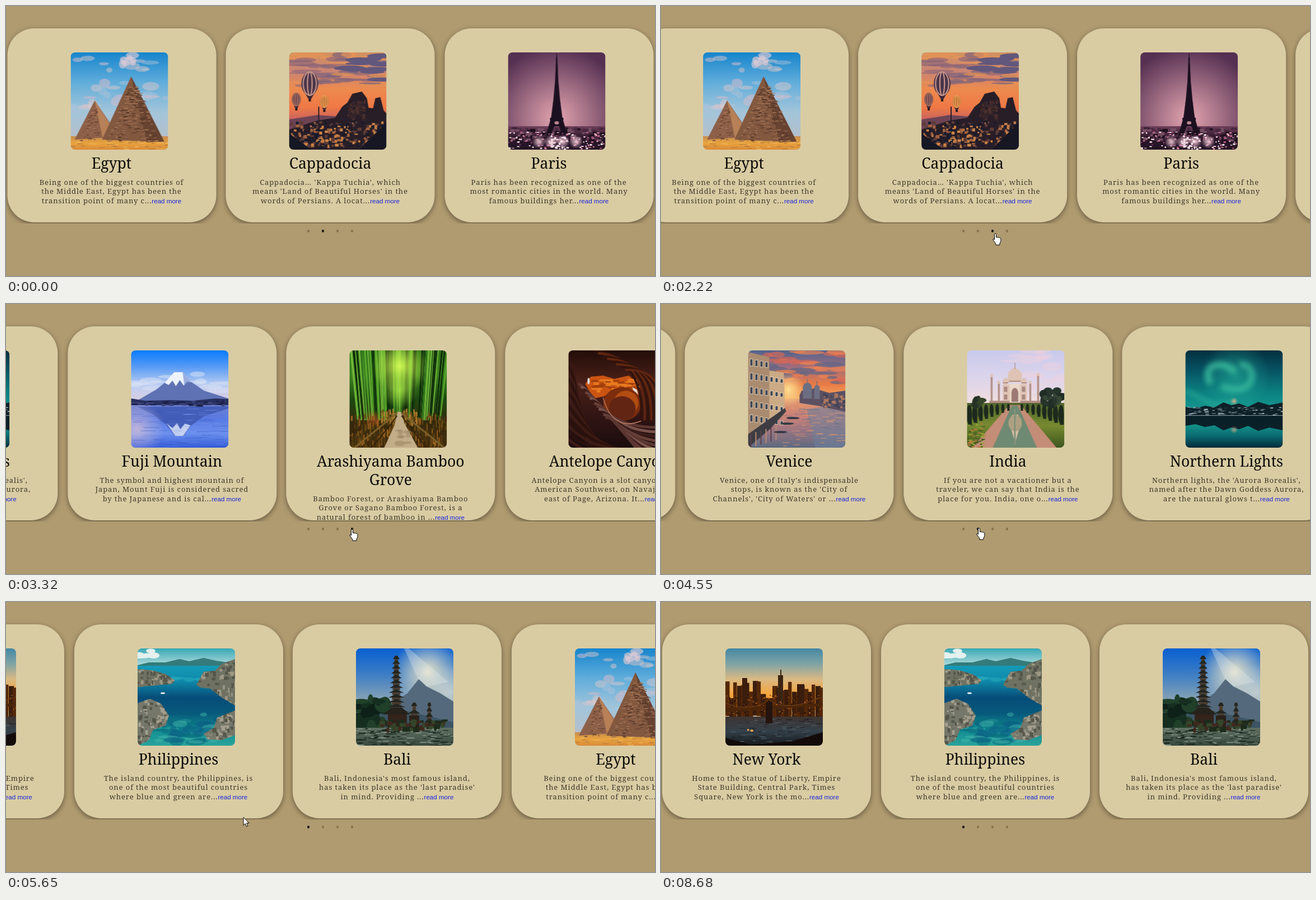
Recreate the animation shown at these times as an HTML page with a canvas. Size 1159 by 483 pixels, loop 9180 ms.

```html
<!DOCTYPE html>
<html lang="en">
<head>
<meta charset="utf-8">
<title>Destinations</title>
<style>
html, body { margin: 0; width: 100%; height: 100%; overflow: hidden; background: #b09b70; }
#view { position: absolute; left: 0; top: 0; width: 1159px; height: 389px; overflow: hidden; }
#track { position: absolute; left: 0; top: 0; }
.card { position: absolute; top: 40px; width: 373px; height: 347px; border-radius: 48px;
  background: #d9cca3; box-shadow: 0 3px 10px rgba(0,0,0,.42); text-align: center; white-space: nowrap;
  font-family: "Noto Serif", serif; }
.card canvas { display: block; margin: 43px 0 0 113px; border-radius: 8px; }
h2 { margin: 8px 0 8.6px; font-size: 26.5px; line-height: 33px; font-weight: 500; color: #0c0b08; }
p { margin: 0; font-size: 13px; line-height: 16.7px; letter-spacing: .9px; font-weight: 300; color: #40382a; }
p span { font: 11.6px/0 "Liberation Sans", Arial, sans-serif; letter-spacing: 0; color: #1a26dd; }
.dot { position: absolute; top: 400px; width: 4.6px; height: 4.6px; border-radius: 50%; }
svg { position: absolute; left: 0; top: 0; overflow: visible; fill: #fff; stroke: #000; stroke-linejoin: round; }
</style>
</head>
<body>
<div id="view"><div id="track"></div></div>
<svg id="cursor" width="20" height="24"><path/></svg>
<script>
const LOOP = 9180, PITCH = 390.5, S = 174;
let g, seed;

// Drawing helpers for the 174 px pictures
const rnd = () => (seed = seed * 16807 % 2147483647) / 2147483647;
const box = (c, x, y, w, h) => { g.fillStyle = c; g.fillRect(x, y, w, h); };
const oval = (c, x, y, rx, ry = rx) => {
  g.fillStyle = c; g.beginPath(); g.ellipse(x, y, rx, ry, 0, 0, 7); g.fill();
};
const poly = (c, ...p) => {
  g.fillStyle = c; g.beginPath();
  for (let i = 0; i < p.length; i += 2) g.lineTo(p[i], p[i + 1]);
  g.fill();
};
const fade = (y0, y1, ...cols) => {
  const f = g.createLinearGradient(0, y0, 0, y1);
  cols.forEach((c, i) => f.addColorStop(i / (cols.length - 1), c));
  box(f, 0, y0, S, y1 - y0);
};
const glow = (c, x, y, r) => {
  const f = g.createRadialGradient(x, y, 0, x, y, r);
  f.addColorStop(0, c); f.addColorStop(1, c.slice(0, 7) + "00");
  box(f, 0, 0, S, S);
};
const specks = (cols, n, x, y, w, h, sw, sh) => {
  while (n--) box(cols[n % cols.length], x + rnd() * w, y + rnd() * h, sw * (.5 + rnd()), sh * (.5 + rnd()));
};
const clouds = (cols, n, x, y, w, h, rx, ry) => {
  while (n--) oval(cols[n % cols.length], x + rnd() * w, y + rnd() * h, rx * (.4 + rnd()), ry * (.4 + rnd()));
};
const rock = (light, dark, x, y, w, h, ...p) => {
  g.save(); poly(dark, ...p); g.clip();
  specks([light, dark, "#55564a"], 130, x, y, w, h, 5, 6);
  g.restore();
};
const curve = (c, width, x, y, ...b) => {
  g.strokeStyle = c; g.lineWidth = width; g.beginPath(); g.moveTo(x, y); g.bezierCurveTo(...b); g.stroke();
};

function newYork() {
  fade(0, 110, "#4488a4", "#7fa3a4", "#d9b983", "#f5a53c", "#ee7d18");
  for (let x = 0; x < S; x += 7) box(x % 2 ? "#3b1d0d" : "#532708", x, 58 + rnd() * 32, 6 + rnd() * 4, 62);
  box("#3a2414", 94, 48, 9, 70); box("#3a2414", 98, 38, 2, 12);
  box("#3b1d0d", 30, 53, 9, 60); box("#3b1d0d", 128, 64, 13, 50);
  specks(["#b8621c", "#6b3510", "#241008"], 170, 0, 82, S, 38, 2, 2);
  fade(122, S, "#3e3430", "#33404a", "#15191d");
  specks(["#4d5961", "#221f20"], 110, 0, 126, S, 44, 8, 1);
  poly("#4a2509", 0, 107, S, 98, S, 103, 0, 114);
  box("#25140e", 72, 94, 12, 40);
  curve("#6a3a16", 1.5, 0, 97, 30, 112, 60, 105, 77, 93);
  curve("#6a3a16", 1.5, 79, 93, 100, 108, 135, 105, S, 86);
  poly("#130b0a", 0, 160, 45, 172, 120, 166, S, 150, S, S, 0, S);
  specks(["#f0b050"], 5, 38, 144, 12, 4, 3, 2);
}

function philippines() {
  fade(0, 32, "#38a8b4", "#b4dddd");
  clouds(["#e4f1ee"], 5, 0, 4, 40, 10, 16, 4);
  poly("#347b7a", 0, 30, 20, 25, 50, 25, 75, 19, 92, 23, 118, 17, 140, 22, S, 27, S, 34, 0, 34);
  fade(31, S, "#159bb9", "#0f87a8", "#064c78", "#075a7c", "#128d93", "#2aa39b");
  clouds(["#0b5f8499", "#45b9ac77", "#0a6f7f88"], 40, 30, 116, 120, 54, 14, 5);
  clouds(["#24a9bb99"], 8, 55, 52, 70, 6, 16, 3);
  rock("#9d9885", "#6f7262", 0, 32, 70, 45, 0, 37, 25, 39, 50, 46, 66, 57, 62, 63, 35, 66, 0, 69);
  rock("#9d9885", "#6f7262", 104, 20, 70, 84, 105, 65, 118, 42, 138, 40, 150, 28, S, 19, S, 102, 150, 88, 130, 72, 112, 70);
  rock("#a39e8e", "#75776a", 0, 90, 56, 84, 0, 98, 22, 90, 42, 99, 56, 120, 50, 138, 28, 145, 20, 164, 0, S);
  rock("#a39e8e", "#75776a", 118, 112, 56, 54, 118, 153, 136, 142, 142, 124, S, 111, S, 155, 150, 164, 126, 163);
  oval("#f0f4f2", 45, 80, 4, 1.6);
}

function pagoda(x, top, base, wide, tiers) {
  for (let i = 0; i < tiers; i++) {
    const y = top + (base - top) * i / tiers, w = wide * (.35 + .65 * i / tiers) / 2;
    poly("#24251f", x - 2, y, x + 2, y, x + w, y + 6, x - w, y + 6);
    box("#4a3c2e", x - w * .55, y + 6, w * 1.1, (base - top) / tiers - 5);
  }
}
function bali() {
  fade(0, 145, "#075fd0", "#3f7fc4", "#8ea6b4", "#76838a");
  glow("#f5e9c8f0", 128, 42, 62); glow("#dfe2d9aa", 168, 78, 50);
  poly("#dfe7e955", 86, 0, 94, 0, 165, 60, 118, 70);
  poly("#54697b", 50, 110, 92, 80, 112, 55, 126, 68, 150, 80, S, 95, S, 150, 40, 150);
  poly("#3c5464", 0, 96, 45, 92, 90, 112, 150, 126, S, 132, S, 150, 0, 150);
  clouds(["#152e20", "#20402a", "#0e2119"], 34, 0, 94, 54, 48, 13, 10);
  fade(142, S, "#5f7062", "#39493f");
  specks(["#829083", "#26352a", "#18221b"], 120, 0, 142, S, 32, 10, 1.5);
  pagoda(72, 13, 108, 34, 11);
  box("#33231b", 57, 112, 34, 30);
  poly("#26221c", 50, 118, 63, 106, 82, 106, 96, 118);
  pagoda(104, 97, 124, 32, 2); box("#2b211a", 95, 120, 18, 24);
  pagoda(131, 97, 136, 20, 4); box("#2b211a", 126, 130, 10, 14);
  specks(["#1d2b1b", "#34452a", "#40291f"], 70, 40, 127, 114, 15, 8, 6);
}

function egypt() {
  fade(0, 160, "#1685cc", "#60addb", "#a3c5da", "#b8bec8");
  clouds(["#d3bccb88", "#aec4d877", "#e1c9ca77"], 38, 0, 8, S, 125, 13, 6);
  clouds(["#d9c9d5aa"], 9, 92, 5, 20, 18, 9, 6);
  fade(150, S, "#c78b4e", "#e8a33e", "#d88b37");
  poly("#8d6049", 43, 86, 7, 156, 65, 152, 70, 126);
  poly("#b78057", 43, 86, 57, 153, 71, 130);
  poly("#82583f", 108, 43, 56, 156, 150, 160, 166, 160);
  poly("#684331", 108, 43, 136, 161, 167, 159);
  for (let y = 60; y < 158; y += 5) {
    const k = (y - 43) / 115;
    specks(["#a27456", "#573829"], 12, 110 - 48 * k, y, 98 * k, 4, 5, 1.3);
    if (y > 98) specks(["#69432f", "#a67758"], 5, 45 - 34 * (y - 86) / 70, y, 40 * (y - 86) / 70, 4, 4, 1.3);
  }
  specks(["#b97a3a", "#f2b85c"], 50, 0, 158, S, 15, 9, 1);
}

function balloon(x, y, rx, ry, dark, light) {
  poly("#3d2634", x - rx * .6, y + ry * .75, x + rx * .6, y + ry * .75, x + 2, y + ry * 1.35, x - 2, y + ry * 1.35);
  oval(dark, x, y, rx, ry);
  for (const k of [.78, .28]) {
    g.strokeStyle = light; g.lineWidth = rx / 7;
    g.beginPath(); g.ellipse(x, y, rx * k, ry, 0, 0, 7); g.stroke();
  }
  box("#24171d", x - 2, y + ry * 1.32, 4, 4);
}
function cappadocia() {
  fade(0, 130, "#d4935f", "#c98474", "#ec8b4f", "#f07945", "#ba5b69");
  clouds(["#75617eaa", "#916777aa", "#e89455aa"], 48, 0, 0, S, 60, 23, 3.5);
  clouds(["#62577c"], 12, 90, 6, 84, 45, 24, 4);
  poly("#6d4354", 0, 120, 50, 112, 90, 115, S, 115, S, 150, 0, 150);
  poly("#281e27", 0, 138, 50, 122, 82, 117, 95, 97, 104, 90, 113, 74, 130, 70, 139, 82, 142, 99, 150, 100, 154, 82, 163, 80, 169, 104, S, 109, S, S, 0, S);
  specks(["#4b302d", "#35242a"], 70, 102, 84, 34, 36, 4, 5);
  specks(["#a1623e", "#171b2c", "#5c3c39", "#cc8448"], 260, 0, 123, S, 46, 5, 4);
  poly("#161824", 0, 145, 40, S, 0, S); poly("#171724", S, 125, S, S, 125, S);
  box("#291d27", 52, 97, 2, 28);
  balloon(37, 56, 15, 21, "#493448", "#c9978c");
  balloon(13, 84, 8, 12, "#744a51", "#ad7760");
  balloon(63, 88, 8, 11, "#c87940", "#eaa352");
}

function paris() {
  box("#553052", 0, 0, S, S);
  glow("#e4a5b0ff", 86, 118, 128);
  fade(132, S, "#70405b", "#2c172a", "#241326");
  specks(["#20101f", "#4a2941", "#765065"], 130, 0, 134, S, 22, 7, 5);
  const iron = "#1b1020";
  poly(iron, 86, 8, 88, 8, 90, 52, 93, 85, 97, 116, 106, 148, 97, 148, 91, 132, 83, 132, 77, 148, 68, 148, 77, 116, 81, 85, 84, 52);
  box(iron, 86.4, 2, 1.2, 10); box(iron, 80, 91, 14, 3); box(iron, 75, 117, 24, 4);
  oval("#b9848f", 87, 126, 4, 3);
  specks(["#ffdce8", "#e58da9", "#fff4ef", "#bc5e87"], 120, 0, 141, S, 30, 3, 2);
  for (const x of [55, 76, 98, 121]) glow("#ffd6e4dd", x, 160, 12);
  specks(["#ffe9ef"], 26, 72, 148, 30, 24, 3, 3);
}

function venice() {
  fade(0, 90, "#4f6390", "#a06d7d", "#e87a45", "#f7b266");
  clouds(["#5c6587aa", "#f08350aa", "#d76757aa"], 42, 30, 0, 144, 58, 20, 4);
  fade(86, S, "#e69a6d", "#cc8277", "#9a7582", "#5c6a80");
  glow("#ffdf90ff", 72, 70, 30);
  poly("#71809c99", S, 95, S, S, 120, S, 105, 105);
  specks(["#e39b6b99", "#6c708799"], 130, 55, 96, 119, 76, 11, 1.2);
  poly("#5c5163", 92, 80, 96, 72, 118, 68, 145, 76, S, 72, S, 110, 130, 100, 92, 94);
  specks(["#ad7860", "#434555"], 60, 130, 77, 44, 24, 4, 4);
  for (const [x, y, r] of [[106, 66, 8], [123, 67, 5]]) { oval("#6c6f83", x, y, r); box("#6c6f83", x - r, y, 2 * r, 20); box("#6c6f83", x - .7, y - r - 7, 1.4, 8); }
  poly("#aa8b70", 0, 3, 38, 12, 38, 137, 0, 165);
  poly("#cbaa86", 38, 36, 64, 40, 66, 108, 38, 130);
  for (let y = 14; y < 130; y += 25) for (let x = 4; x < 62; x += 9) {
    if (x > 32 && y < 35) continue;
    box("#e4cfb0", x - 1, y + x * .2, 6, 14 - x * .1); box("#3e4656", x, y + 1 + x * .2, 4, 12 - x * .1);
  }
  poly("#3d3c43", 0, 150, 66, 103, 68, 109, 40, 140, 0, S);
  for (let x = 4; x < 50; x += 9) box(x % 2 ? "#b88a70" : "#59434a", x, 150 - x * .3, 2, 25);
  for (const [x, y] of [[70, 131], [80, 121], [58, 146]]) oval("#343944", x, y, 12, 2);
}

function india() {
  fade(0, 100, "#c8caec", "#ddd5ec", "#f3dfdc");
  clouds(["#edcfdc77"], 14, 70, 0, 104, 70, 22, 6);
  fade(94, S, "#52672f", "#778a30", "#3d5620");
  const stone = "#dfc3b4", shade = "#b18e84";
  for (const [x, y] of [[44, 45], [57, 57], [113, 57], [127, 43]]) { box(shade, x - 1.7, y, 3.4, 92 - y); oval(stone, x, y, 2.6, 3); }
  box(stone, 64, 61, 43, 32); box(shade, 40, 90, 92, 4);
  poly(stone, 74, 57, 73, 45, 77, 37, 85, 30, 94, 37, 98, 45, 97, 57);
  oval(stone, 85.5, 44, 12.5, 11); box(shade, 85, 22, 1.2, 11); box(shade, 75, 54, 21, 2);
  for (const x of [69, 102]) { oval(stone, x, 55, 5, 6); box(shade, x - 5, 57, 10, 2); }
  box("#ecd8c9", 76, 60, 19, 33); oval("#9c7a73", 85.5, 76, 6, 9); box("#9c7a73", 79.5, 76, 12, 16);
  for (const x of [66, 98]) for (const y of [65, 79]) box("#a98981", x, y, 6, 9);
  poly("#c48d77", 75, 98, 96, 98, 160, S, 10, S);
  poly("#6f8a72", 80, 99, 91, 99, 125, S, 46, S);
  poly("#d8bea4", 81, 115, 92, 115, 94, 138, 86, 165, 78, 138);
  oval("#afa083", 86, 130, 12, 15); box("#84927a", 84, 105, 3, 64);
  for (let i = 0; i < 8; i++) {
    const h = 12 + i * 3.2, d = 12 + i * 10;
    for (const s of [-1, 1]) { oval("#1c291c", 86 + s * d, 101 + i * 2, 2.5 + i * .35, h / 2); box("#1c291c", 84 + s * d, 100 + i * 2, 4 + i * .4, h / 2 + 2); }
  }
  clouds(["#27352c", "#364535", "#202c26"], 24, 134, 72, 36, 24, 7, 7);
  clouds(["#263126", "#344529"], 12, 0, 88, 25, 12, 8, 6);
  specks(["#94a335", "#40571f", "#b07b3d"], 60, 0, 130, 28, 44, 5, 2);
}

function lights() {
  fade(0, 110, "#053040", "#065464", "#0c7f80", "#159b91");
  glow("#25b29a99", 90, 45, 62);
  g.filter = "blur(4px)";
  curve("#43c9a6aa", 13, 45, 60, 25, 20, 75, 18, 88, 40);
  curve("#43c9a699", 12, 64, 64, 130, 90, 130, 20, 97, 26);
  curve("#38bda099", 6, 0, 72, 40, 90, 50, 105, 86, 90);
  g.filter = "none";
  fade(112, S, "#0b6b70", "#14938a", "#0a6a70", "#032a3a");
  const peaks = [0, 101, 18, 104, 35, 99, 52, 102, 68, 93, 82, 98, 96, 95, 112, 101, 130, 92, 150, 98, S, 93];
  poly("#0e2028", ...peaks, S, 117, 0, 117);
  poly("#0a2029", ...peaks.map((v, i) => i % 2 ? 236 - v : v), S, 117, 0, 117);
  specks(["#657a83", "#2a3d45", "#9badb1", "#0e2028"], 130, 0, 101, S, 14, 5, 1.5);
  box("#8a9b9d", 0, 116, S, 1);
  glow("#ffb58acc", 87, 91, 7); glow("#ffb58a99", 87, 142, 7);
}

function fuji() {
  fade(0, 92, "#0a7bfc", "#5b9df5", "#b9cdf2", "#dccfe0");
  clouds(["#d9e2f588"], 14, 0, 42, S, 30, 26, 4);
  poly("#5e72b4", 14, 88, 45, 70, 66, 53, 77, 39, 92, 39, 107, 56, 130, 72, S, 86, S, 92, 14, 92);
  poly("#eef3fb", 60, 58, 77, 39, 92, 39, 108, 57, 100, 55, 94, 63, 87, 53, 80, 64, 74, 54, 67, 62);
  poly("#9aaedd", 92, 39, 108, 57, 100, 56, 95, 62);
  fade(97, S, "#6f81d0", "#587ae4", "#6b90ee", "#355cd8");
  poly("#435eb8", 12, 101, S, 100, S, 104, 130, 118, 105, 136, 94, 153, 78, 153, 62, 132, 40, 115);
  poly("#c4cff0", 63, 130, 74, 139, 82, 130, 88, 141, 96, 131, 106, 134, 93, 153, 79, 153);
  glow("#e9c9d4aa", 10, 140, 50);
  specks(["#829be666", "#304fb855"], 90, 0, 104, S, 70, 22, 1);
  poly("#28305f", 0, 86, 25, 90, 70, 89, 110, 90, 150, 86, S, 87, S, 98, 0, 98);
  specks(["#3d4379", "#1c224c"], 50, 0, 89, S, 8, 7, 3);
}

function bamboo() {
  fade(0, S, "#2f7416", "#3d8620", "#1e4a11", "#35290d", "#46300f");
  for (let i = 0; i < 95; i++) {
    const x = rnd() * S, c = ["#12380d", "#59a82b", "#2c701b", "#75b83b", "#0b2609"][i % 5];
    const foot = 88 + (x - 88) * .85;
    poly(c, x, 0, x + 2 + rnd() * 2, 0, foot + 2, 125, foot, 125);
  }
  glow("#d7ff55ee", 90, 28, 50); glow("#b3ed4bbb", 89, 72, 32);
  specks(["#6c4814", "#9b6320", "#3a240b", "#4f3a11"], 330, 0, 112, S, 62, 2, 12);
  for (const s of [-1, 1]) specks(["#b7832e", "#71521d"], 40, 88 + s * 20 - 12, 104, 24, 22, 2, 8);
  glow("#d9602599", 43, 122, 16);
  poly("#c3ad88", 86, 110, 92, 110, 98, 130, 122, S, 62, S, 80, 135);
  clouds(["#9c876799"], 8, 78, 140, 28, 28, 8, 4);
  for (const s of [-1, 1]) {
    curve("#7d6029", 3, 89 + s * 4, 112, 89 + s * 18, 124, 89 + s * 45, 145, 89 + s * 80, S);
    curve("#332008", 2, 89 + s * 4, 117, 89 + s * 14, 130, 89 + s * 32, 155, 89 + s * 50, S);
  }
}

function canyon() {
  fade(0, S, "#230d09", "#4a2118", "#321514", "#1b0c0d");
  poly("#cb5412", 30, 60, 40, 47, 62, 45, 82, 51, 108, 45, 122, 58, 126, 80, 105, 78, 82, 66, 65, 82, 45, 86);
  specks(["#e77a20", "#a23f0d"], 45, 38, 50, 78, 22, 13, 4);
  poly("#eadfd8", 114, 66, 122, 70, 125, 82, 119, 80); oval("#dde0e7", 36, 55, 2, 6);
  oval("#7b2d0d", 96, 96, 34, 30); oval("#b34c12", 103, 94, 22, 22); oval("#622514", 96, 104, 24, 22);
  for (let i = 0; i < 13; i++) {
    const c = ["#5b3631", "#79524b", "#3a1c1a", "#684039"][i % 4];
    curve(c, 5, 18 + i * 4, 60 + i * 5, 45 + i * 4, 70 + i * 4, 55 + i * 6, 145 + i * 4, S, 137 + i * 9);
    curve(i % 2 ? "#3b1b14" : "#2b110d", 5, -5, 22 + i * 12, 25, 55 + i * 12, 10 + i * 5, 130 + i * 5, 38 + i * 8, 178);
  }
  for (let i = 0; i < 8; i++) curve(i % 2 ? "#602611" : "#32130c", 4, 45 + i * 8, i * 5, 100 + i * 6, 5 + i * 4, 135 + i * 5, 50, 130 + i * 6, 125);
  curve("#b77a60", 1.5, 62, 84, 72, 125, 98, 140, 130, 126);
}

const cards = [
  [newYork, "New York", "Home to the Statue of Liberty, Empire", "State Building, Central Park, Times", "Square, New York is the mo"],
  [philippines, "Philippines", "The island country, the Philippines, is", "one of the most beautiful countries", "where blue and green are"],
  [bali, "Bali", "Bali, Indonesia's most famous island,", "has taken its place as the 'last paradise'", "in mind. Providing "],
  [egypt, "Egypt", "Being one of the biggest countries of", "the Middle East, Egypt has been the", "transition point of many c"],
  [cappadocia, "Cappadocia", "Cappadocia… 'Kappa Tuchia', which", "means 'Land of Beautiful Horses' in the", "words of Persians. A locat"],
  [paris, "Paris", "Paris has been recognized as one of the", "most romantic cities in the world. Many", "famous buildings her"],
  [venice, "Venice", "Venice, one of Italy's indispensable", "stops, is known as the 'City of", "Channels', 'City of Waters' or "],
  [india, "India", "If you are not a vacationer but a", "traveler, we can say that India is the", "place for you. India, one o"],
  [lights, "Northern Lights", "Northern lights, the 'Aurora Borealis',", "named after the Dawn Goddess Aurora,", "are the natural glows t"],
  [fuji, "Fuji Mountain", "The symbol and highest mountain of", "Japan, Mount Fuji is considered sacred", "by the Japanese and is cal"],
  [bamboo, "Arashiyama Bamboo<br>Grove", "Bamboo Forest, or Arashiyama Bamboo", "Grove or Sagano Bamboo Forest, is a", "natural forest of bamboo in "],
  [canyon, "Antelope Canyon", "Antelope Canyon is a slot canyon in the", "American Southwest, on Navajo lands", "east of Page, Arizona. It"]
];
const track = document.getElementById("track");
cards.forEach(([draw, title, ...lines], i) => {
  const card = document.createElement("div");
  card.className = "card";
  card.style.left = 2 + i * PITCH + "px";
  card.innerHTML = `<canvas width="${S}" height="${S}"></canvas><h2>${title}</h2><p>${lines.join("<br>")}...<span>read more</span></p>`;
  track.append(card);
  g = card.firstChild.getContext("2d");
  seed = 4321 + i * 77;
  draw();
});
const dots = [0, 1, 2, 3].map(i => {
  const d = document.createElement("div");
  d.className = "dot";
  d.style.left = 537.7 + i * 26 + "px";
  document.body.insertBefore(d, document.getElementById("cursor"));
  return d;
});

// [click time, page]
const clicks = [[1167, 0], [2069, 2], [3002, 3], [4399, 1], [5416, 0]];
// [time, x, y, hand until next key]
const path = [[200, 730, 462, 0], [1000, 539, 402, 1], [1200, 541, 403, 0], [1400, 586, 408, 0], [1700, 597, 407, 1],
  [2420, 597, 407, 0], [2820, 618, 403, 1], [3420, 618, 403, 0], [4020, 568, 401, 0], [4120, 568, 401, 1],
  [4650, 568, 401, 0], [5050, 540, 401, 1], [5450, 540, 401, 0], [5650, 424, 385, 0], [6250, 376, 360, 0],
  [6750, 317, 347, 1], [6970, 317, 347, 0], [7870, 332, 408, 0], [8070, 338, 416, 0], [8670, 375, 478, 0]];
const ARROW = "M0 0V14.5L3.3 11.4 5.6 16.6 8 15.6 5.7 10.5H10Z";
const HAND = "M-1.5 1.5a1.5 1.5 0 0 1 3 0V7l1-.6 2 .6 1-.3 2 .9 1-.2 1.4 1.6V14l-2 4v2.5h-7V18l-5-6.5q-.5-2 1.5-1.7l1.1 1.4z";
const cursor = document.getElementById("cursor"), shape = cursor.firstChild;

// cubic-bezier(.25, .1, .25, 1)
function ease(x) {
  if (x >= 1) return 1;
  let lo = 0, hi = 1, s;
  for (let i = 0; i < 24; i++) {
    s = (lo + hi) / 2;
    if (.75 * s - .75 * s * s + s ** 3 < x) lo = s; else hi = s;
  }
  return .3 * s * (1 - s) ** 2 + 3 * s * s * (1 - s) + s ** 3;
}

function snap(t) {
  const phase = t < 2020 ? 0 : t < 4240 ? 20 : t < 6950 ? 50 : t < 8600 ? 70 : 80;
  return Math.floor((t - phase) / 100) * 100 + phase;
}

function render(t) {
  let from = 1, page = 1, start = -1e4;
  for (const [at, to] of clicks) if (t >= at) { from = page; page = to; start = at; }
  const pos = from + (page - from) * ease((t - start) / 500);
  track.style.transform = `translateX(${-pos * 3 * PITCH}px)`;
  dots.forEach((d, i) => d.style.background = i === page ? "#1f1a14" : "#85744f");

  const k = path.findIndex((p, i) => i < path.length - 1 && t >= p[0] && t < path[i + 1][0]);
  cursor.style.display = k < 0 ? "none" : "block";
  if (k < 0) return;
  const [t0, x0, y0, hand] = path[k], [t1, x1, y1] = path[k + 1], f = (t - t0) / (t1 - t0);
  cursor.style.transform = `translate(${x0 + (x1 - x0) * f}px,${y0 + (y1 - y0) * f}px)`;
  shape.setAttribute("d", hand ? HAND : ARROW);
}

const begin = performance.now();
function tick() {
  render(snap((performance.now() - begin) % LOOP));
  requestAnimationFrame(tick);
}
tick();
</script>
</body>
</html>
```
